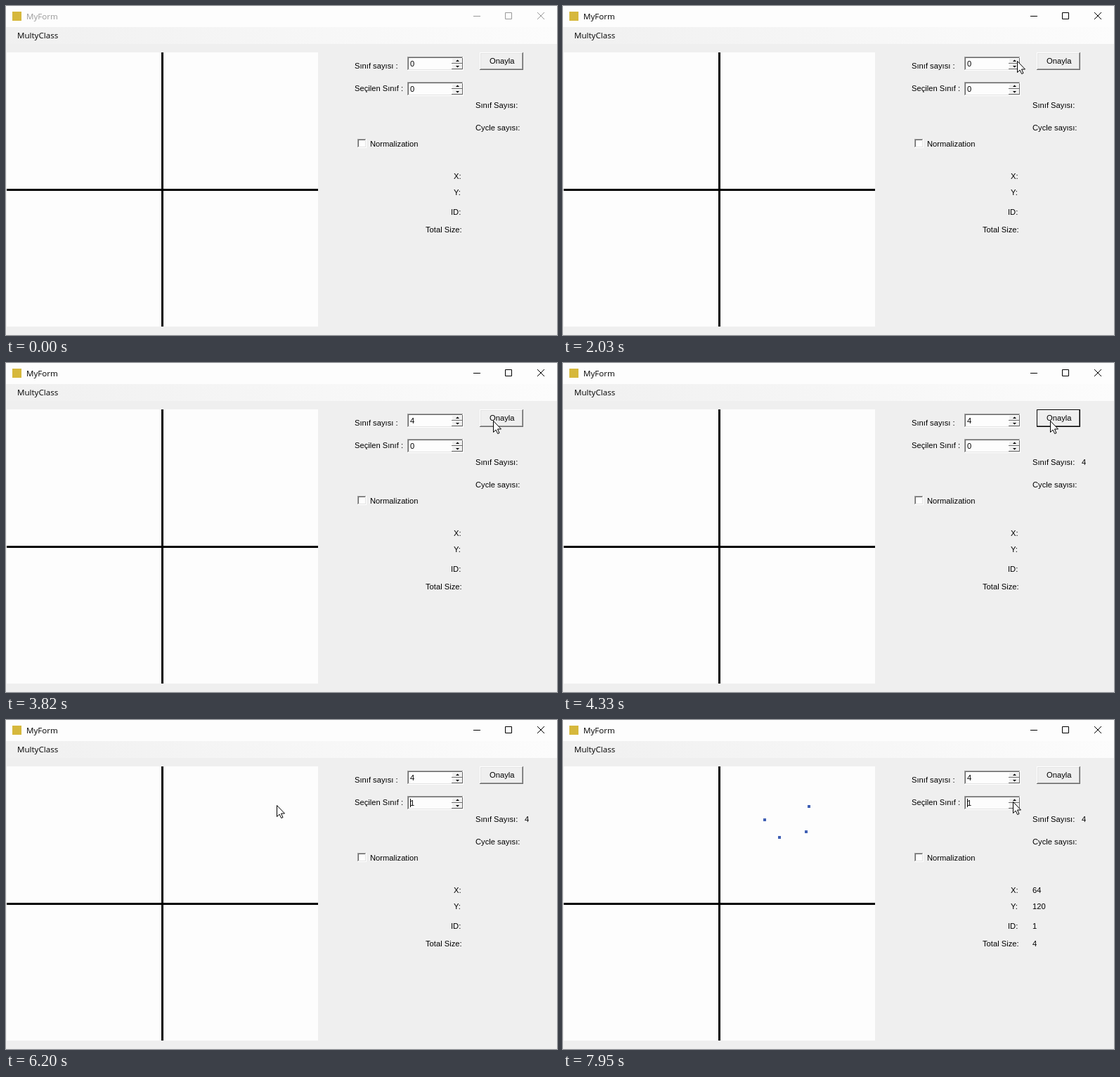
An HTML page with a canvas for the animation above (7.99 s loop, 784 by 468 pixels).

```html
<!DOCTYPE html>
<html lang="tr">
<head>
<meta charset="utf-8">
<title>MyForm</title>
<style>
  html, body { margin: 0; width: 100%; height: 100%; overflow: hidden; background: #efefef; }
  canvas { display: block; }
</style>
</head>
<body>
<canvas id="stage" width="784" height="468"></canvas>
<script>
const ctx = document.getElementById('stage').getContext('2d');
const LOOP = 7990;
const FORM = '#efefef', PAPER = '#fdfdfd', INK = '#000';
const EDGE = '#a0a0a0', DARK = '#696969', LIGHT = '#fff';
const UI = '11.2px "Liberation Sans", Arial, sans-serif';
const CAPTION = '11.6px "Open Sans", sans-serif';
const ORIGIN = { x: 222, y: 261 };

const ACTIVATE = 900, CONFIRM = 4240, SELECT = 5680;
const COUNT = { start: 2220, step: 250, max: 4 };
const PLACE = { start: 6420, step: 280 };
const BLINK = 530;

// plot coordinates, placed one after another
const POINTS = [[127, 139], [123, 103], [85, 95], [64, 120]]
  .map(([x, y], i) => ({ x, y, at: PLACE.start + i * PLACE.step }));

// places where the pointer rests, with arrival and departure
const rest = (x, y, from, to = from) => ({ x, y, from, to });
const STOPS = [
  rest(695, 470, 0, 350),
  rest(646, 78, 2040, 3150),
  rest(693, 82, 3650, 4400),
  rest(621, 97, 5000),
  rest(640, 114, 5350, 5740),
  ...POINTS.map(p => rest(ORIGIN.x + p.x, ORIGIN.y - p.y, p.at - 90, p.at + 50)),
  rest(640, 116, 7940, LOOP)
];

function rect(x, y, w, h, color) {
  ctx.fillStyle = color;
  ctx.fillRect(x, y, w, h);
}

function text(str, x, y, font = UI, color = INK) {
  ctx.font = font;
  ctx.fillStyle = color;
  ctx.fillText(str, x, y);
}

function bevel(x, y, w, h, light, dark) {
  rect(x, y, w, 1, light);
  rect(x, y, 1, h, light);
  rect(x, y + h - 1, w, 1, dark);
  rect(x + w - 1, y, 1, h, dark);
}

function sunken(x, y, w, h) {
  rect(x, y, w, h, PAPER);
  bevel(x, y, w, h, EDGE, LIGHT);
  bevel(x + 1, y + 1, w - 2, h - 2, DARK, '#e3e3e3');
}

function polygon(pts, color) {
  ctx.beginPath();
  pts.forEach(([x, y]) => ctx.lineTo(x, y));
  ctx.closePath();
  ctx.fillStyle = color;
  ctx.fill();
}

function spinner(y, value) {
  sunken(571, y, 80, 20);
  for (const dir of [-1, 1]) {
    const top = y + 6 + 4 * dir, mid = top + 4;
    rect(634, top, 16, 8, FORM);
    bevel(634, top, 16, 8, LIGHT, DARK);
    polygon([[640, mid - dir], [645, mid - dir], [642.5, mid + 1.5 * dir]], INK);
  }
  text(value, 575, y + 14);
}

function button(focused) {
  rect(674, 66, 62, 25, FORM);
  if (focused) {
    bevel(674, 66, 62, 25, INK, INK);
    bevel(675, 67, 60, 23, LIGHT, DARK);
  } else {
    bevel(674, 66, 62, 25, LIGHT, DARK);
    bevel(675, 67, 60, 23, '#e3e3e3', EDGE);
  }
  text('Onayla', 688, 82);
}

function titleBar(active) {
  const color = active ? INK : '#999';
  rect(0, 0, 784, 30, PAPER);
  rect(9, 8, 13, 13, '#d6b83c');
  text('MyForm', 29, 19, CAPTION, color);
  ctx.strokeStyle = color;
  ctx.lineWidth = 1;
  ctx.beginPath();
  ctx.moveTo(665, 14.5);
  ctx.lineTo(675, 14.5);
  ctx.rect(710.5, 9.5, 9, 9);
  ctx.moveTo(756, 9);
  ctx.lineTo(766, 19);
  ctx.moveTo(766, 9);
  ctx.lineTo(756, 19);
  ctx.stroke();
}

function menuBar() {
  const fade = ctx.createLinearGradient(0, 0, 784, 0);
  fade.addColorStop(0, '#f0f0f0');
  fade.addColorStop(1, '#fcfcfc');
  rect(0, 30, 784, 24, fade);
  text('MultyClass', 16, 46, CAPTION);
}

function plot(placed) {
  rect(1, 66, 443, 390, PAPER);
  rect(221, 66, 3, 390, INK);
  rect(1, 260, 443, 3, INK);
  placed.forEach(p => rect(ORIGIN.x + p.x - 1, ORIGIN.y - p.y - 1, 4, 4, '#4060b4'));
}

function labels() {
  text('Sınıf sayısı :', 496, 89);
  text('Seçilen Sınıf :', 496, 121);
  text('Sınıf Sayısı:', 668, 145);
  text('Cycle sayısı:', 668, 177);
  text('Normalization', 518, 200);
  text('X:', 637, 246);
  text('Y:', 637, 269);
  text('ID:', 633, 297);
  text('Total Size:', 597, 322);
}

function readout(placed) {
  if (!placed.length) return;
  const { x, y } = placed[placed.length - 1];
  text(x, 668, 246);
  text(y, 668, 269);
  text('1', 668, 297);
  text(placed.length, 668, 322);
}

function pointerAt(t) {
  const next = STOPS.findIndex(s => t < s.to);
  const b = STOPS[next], a = STOPS[Math.max(0, next - 1)];
  if (t >= b.from) return b;
  const k = (t - a.to) / (b.from - a.to), e = k * k * (3 - 2 * k);
  return { x: a.x + (b.x - a.x) * e, y: a.y + (b.y - a.y) * e };
}

function pointer(t) {
  const { x, y } = pointerAt(t);
  ctx.save();
  ctx.translate(Math.round(x) + 0.5, Math.round(y) + 0.5);
  polygon([[0, 0], [0, 16], [3.6, 12.6], [6.2, 18], [8.5, 17], [6, 11.5], [11, 11.5]], LIGHT);
  ctx.strokeStyle = INK;
  ctx.lineWidth = 1;
  ctx.stroke();
  ctx.restore();
}

function draw(t) {
  const placed = POINTS.filter(p => t >= p.at);
  const clicks = Math.floor((t - COUNT.start) / COUNT.step) + 1;
  const selected = t >= SELECT;
  rect(0, 0, 784, 468, FORM);
  titleBar(t >= ACTIVATE);
  menuBar();
  plot(placed);
  labels();
  spinner(72, Math.max(0, Math.min(COUNT.max, clicks)));
  spinner(108, selected ? 1 : 0);
  if (selected && (t - SELECT) % (2 * BLINK) < BLINK) rect(575, 112, 1, 12, INK);
  button(t >= CONFIRM && !selected);
  sunken(500, 189, 13, 13);
  if (t >= CONFIRM) text(COUNT.max, 738, 145);
  readout(placed);
  pointer(t);
}

const start = performance.now();
function tick() {
  draw((performance.now() - start) % LOOP);
  requestAnimationFrame(tick);
}
tick();
</script>
</body>
</html>
```
